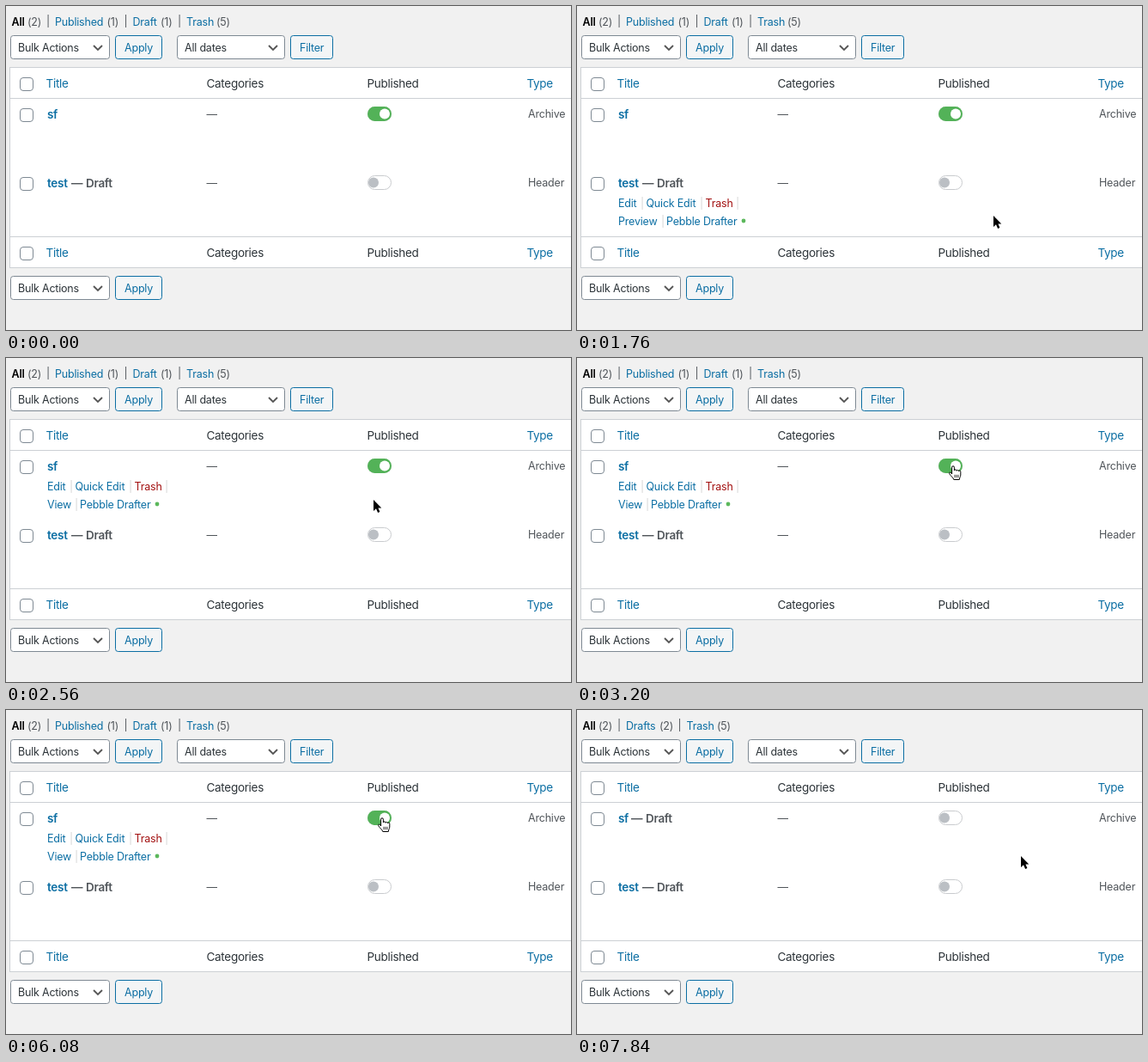
These frames come from a looping animation (658x377 px, 8000 ms). An HTML page:

```html
<!DOCTYPE html>
<html lang="en">
<head>
<meta charset="utf-8">
<title>Layout list</title>
<style>
html, body { margin: 0; width: 100%; height: 100%; overflow: hidden; background: #f1f1f1; }
svg { display: block; }
text { font: 12.5px Inter, "Open Sans", sans-serif; letter-spacing: -.2px; fill: #50555a; }
.big { font-size: 13.5px; letter-spacing: -.3px; }
.bold { font-weight: 600; }
.dark { fill: #2c3338; }
.black { fill: #000; }
.link { fill: #0b6ea3; }
.red { fill: #a31212; }
.pale { fill: #d5d5d5; }
.tip { font-size: 11px; font-weight: 600; fill: #fff; }
</style>
</head>
<body>
<svg id="stage" width="658" height="377" viewBox="0 0 658 377"></svg>
<script>
const STEP = 160, LOOP = 8000;
const ROW1 = 126, ROW2 = 206;

// Pointer tip: [start time, then one x, y pair per step]
const moves = [
  [320, 551, 366, 550, 352, 549, 343, 548, 338],
  [1120, 553, 330, 571, 317, 582, 300, 555, 275, 485, 244, 398, 218, 334, 207],
  [2240, 347, 198, 385, 181, 428, 165, 457, 150, 466, 140, 452, 132, 438, 126],
  [6880, 455, 137, 496, 159, 517, 170]
];

const text = (x, y, s, cls = '') => `<text x="${x}" y="${y}" class="${cls}">${s}</text>`;
const box = (x, y, w, h, r, fill, stroke) =>
  `<rect x="${x}" y="${y}" width="${w}" height="${h}" rx="${r}" fill="${fill}" stroke="${stroke}"/>`;
const line = y => `<path d="M5 ${y}H658" stroke="#ccd0d4"/>`;
const checkbox = y => box(16.5, y - 7.5, 15, 15, 3.5, '#fff', '#7e8993');
const group = (id, body) => `<g id="${id}">${body}</g>`;

const select = (x, y, w, label) => box(x + .5, y + .5, w - 1, 27, 3, '#fff', '#7e8993') +
  text(x + 9, y + 18.5, label, 'dark') +
  `<path d="M${x + w - 19} ${y + 12}l5 5 5-5" fill="none" stroke="#555" stroke-width="1.8"/>`;

const button = (x, y, w, label) => box(x + .5, y + .5, w - 1, 27, 3, '#f3f5f6', '#0b6ea3') +
  text(x + 11, y + 18.5, label, 'link');

const heading = y => checkbox(y + 1) + text(46.5, y + 5, 'Title', 'big link') +
  text(233.5, y + 5, 'Categories', 'big dark') + text(420.5, y + 5, 'Published', 'big dark') +
  text(606.5, y + 5, 'Type', 'big link');

const draft = (x, y) => text(x, y + 5, '—', 'big bold') + text(x + 17, y + 5, 'Draft', 'big bold');

const row = (y, name, type) => checkbox(y + 1) + text(48, y + 5, name, 'big bold link') +
  text(233.5, y + 4, '—') + text(608, y + 4, type);

function actions(y, view, x) {
  const top = y + 28, low = y + 49;
  return text(48, top, 'Edit', 'link') + text(74, top, '|', 'pale') +
    text(80.5, top, 'Quick Edit', 'link') + text(143, top, '|', 'pale') +
    text(149.5, top, 'Trash', 'red') + text(185, top, '|', 'pale') +
    text(48, low, view, 'link') + text(x - 6, low, '|', 'pale') +
    text(x, low, 'Pebble Drafter', 'link') +
    `<circle cx="${x + 90}" cy="${low - 5}" r="2.4" fill="#5cb85c"/>`;
}

const toggle = (id, y) => box(421.5, y - 8.5, 27, 16, 8, '#fff', '#c9cbce') +
  `<rect id="${id}Track" x="421" y="${y - 9}" width="28" height="17" rx="8.5" fill="#53b258"/>` +
  `<circle id="${id}Knob" cx="428" cy="${y - .5}" r="6" fill="#bbbfc4"/>`;

// Each filter: x of label, label, x of count, count
const filters = list => list.map(([x, label, cx, n], i) =>
  text(x, 22.5, label, i ? 'link' : 'bold black') + text(cx, 22.5, `(${n})`) +
  (i ? text(x - 10, 22, '|') : '')).join('');
const all = [6.5, 'All', 25, 2];

const arrow = `<path d="M0 0V13L3 10.3 5.1 15 7.4 14 5.4 9.4H9.3Z" fill="#000" stroke="#fff"
  stroke-width="1.2" paint-order="stroke"/>`;
const hand = `<g transform="translate(-6 -1)"><path d="M4.6 10V2.2a1.4 1.4 0 0 1 2.8 0V6a1.3 1.3 0 0 1 2.6.3
  a1.3 1.3 0 0 1 2.5.5a1.2 1.2 0 0 1 2.3.6V11c0 2-1.3 3-1.5 5.5H6.8C6.5 14.5 3 12 1.6 9.6
  c-.6-1.3 1-2 2-1Z" fill="#fff" stroke="#000"/>
  <path d="M8 10.8v3.4M10 10.8v3.4M12 10.8v3.4" stroke="#000" stroke-width=".8"/></g>`;

const $ = id => document.getElementById(id);
const show = (id, on) => $(id).style.display = on ? '' : 'none';

$('stage').innerHTML =
  group('before', filters([all, [57, 'Published', 117.5, 1], [147.5, 'Draft', 180, 1], [210, 'Trash', 245, 5]])) +
  group('after', filters([all, [57, 'Drafts', 96, 2], [127.5, 'Trash', 163, 5]])) +
  select(5, 34, 116, 'Bulk Actions') + button(127, 34, 55, 'Apply') +
  select(199, 34, 126, 'All dates') + button(331, 34, 50, 'Filter') +
  box(4.5, 71.5, 660, 233, 0, '#fff', '#ccd0d4') + line(107.5) + line(268.5) +
  heading(90) + heading(287) +
  row(ROW1, 'sf', 'Archive') + row(ROW2, 'test', 'Header') + draft(76, ROW2) +
  group('newDraft', draft(63, ROW1)) +
  group('actions1', actions(ROW1, 'View', 86)) +
  group('actions2', actions(ROW2, 'Preview', 104)) +
  toggle('first', ROW1) + toggle('second', ROW2) +
  select(5, 314, 116, 'Bulk Actions') + button(127, 314, 55, 'Apply') +
  group('tooltip', box(429.5, 137.5, 137, 36, 11, '#f5f5f5', '#f0f0f0') +
    box(436.5, 143.5, 123, 20, 1, '#7f8180', '#9b9d9c') +
    text(443, 157, 'Unpublish this layout', 'tip')) +
  group('pointer', group('arrow', arrow) + group('hand', hand));
show('secondTrack', false);

function pointerAt(t) {
  let at = [600, 400];
  for (const [start, ...path] of moves) {
    if (t < start) break;
    const i = Math.min(Math.floor((t - start) / STEP) * 2, path.length - 2);
    at = [path[i], path[i + 1]];
  }
  return at;
}

function draw(now) {
  const t = Math.floor(now % LOOP / STEP) * STEP;
  const [x, y] = pointerAt(t);
  const reloaded = t >= 7840;
  const overToggle = x > 421 && x < 449 && y > 117 && y < 134;
  const off = t < 6240 ? 0 : t < 6400 ? .35 : t < 6560 ? .8 : 1;

  $('pointer').setAttribute('transform', `translate(${x} ${y})`);
  show('arrow', !overToggle);
  show('hand', overToggle);
  show('actions1', y > 108 && y < 187 && !reloaded);
  show('actions2', y >= 187 && y < 268);
  show('tooltip', t >= 4320 && t < 6080);
  show('before', !reloaded);
  show('after', reloaded);
  show('newDraft', reloaded);

  const shade = [187, 191, 196].map(c => Math.round(255 + (c - 255) * off));
  $('firstTrack').setAttribute('opacity', 1 - off);
  $('firstKnob').setAttribute('cx', 441 - 13 * off);
  $('firstKnob').setAttribute('fill', `rgb(${shade})`);
}

function tick() {
  draw(performance.now());
  requestAnimationFrame(tick);
}
tick();
</script>
</body>
</html>
```
